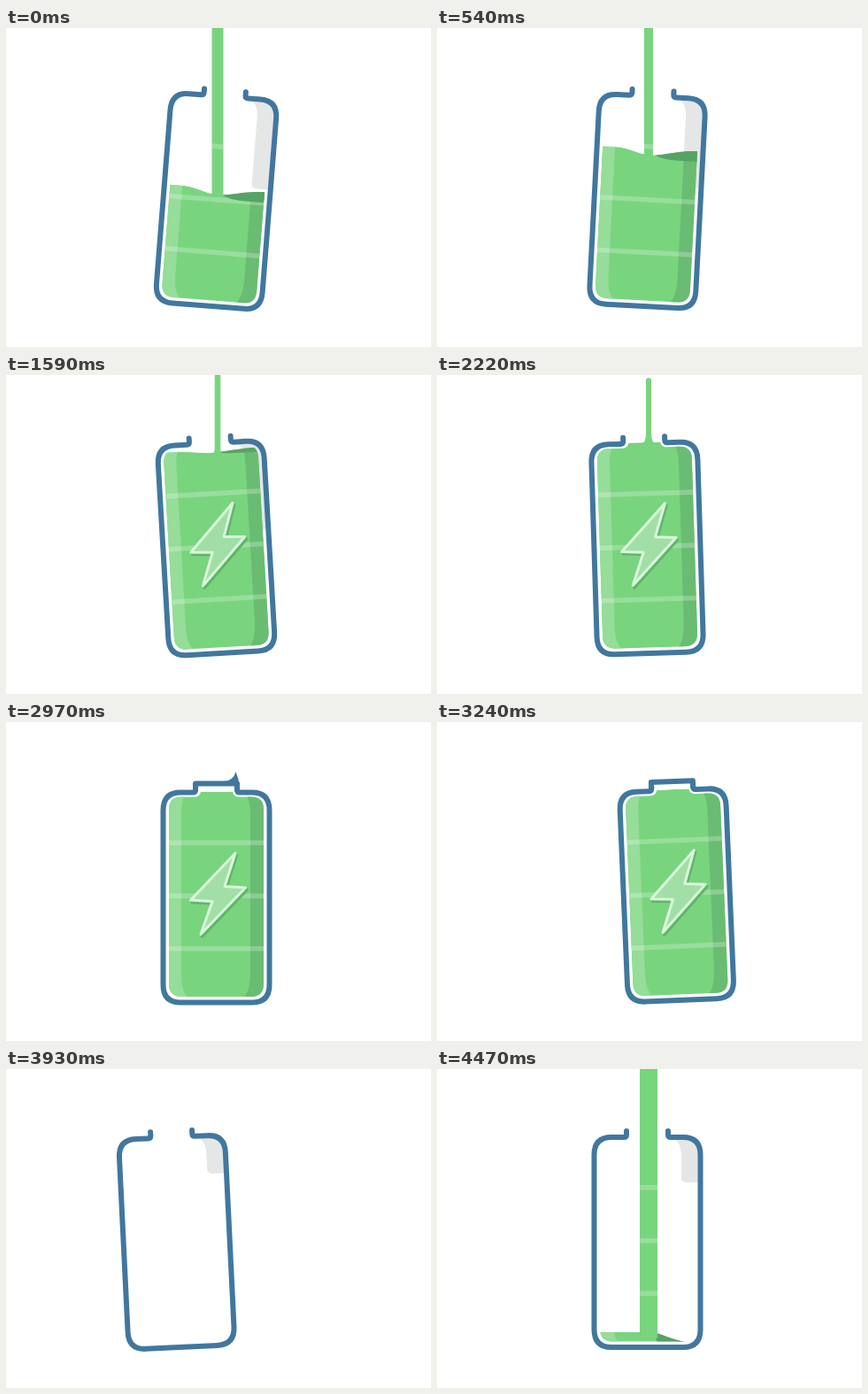
Animation, 480 px wide and 360 px high, one loop 4.5 s. Source, as an HTML page with a canvas:

```html
<!DOCTYPE html>
<html lang="en">
<head>
<meta charset="utf-8">
<title>Battery filling</title>
<style>
html, body { margin: 0; width: 100%; height: 100%; overflow: hidden; background: #fff; }
canvas { display: block; width: 480px; height: 360px; }
</style>
</head>
<body>
<canvas id="stage" width="480" height="360"></canvas>
<script>
const ctx = document.getElementById('stage').getContext('2d');
const LOOP = 4500, FULL = 2220, CX = 237.5, CY = 196, STREAM_X = 239;
const BLUE = '#41779f', GREEN = '#79d47e', LIGHT = '#95dd98', SHADE = '#6abc72', DEEP = '#56a465';

const clamp = v => Math.max(0, Math.min(1, v));
const part = (t, from, to) => clamp((t - from) / (to - from));
const smooth = p => p * p * (3 - 2 * p);

const inner = new Path2D(`M220 76H256Q257 82 263 82H277Q291 82 291 96V293Q291 307.5 277 307.5
  H198Q184 307.5 184 293V96Q184 82 198 82H213Q219 82 220 76Z`);
const glass = new Path2D('M180 79H295V312H180Z');
const shell = new Path2D(`M214 70V74Q214 77 211 77H197Q177.5 77 177.5 97V294Q177.5 314 197 314
  H278Q297.5 314 297.5 294V97Q297.5 77 278 77H264Q261 77 261 74V70`);
const leftGlow = new Path2D('M170 70H209Q198 80 198 98V284Q198 303 207 310H170Z');
const rightShade = new Path2D('M305 70H263Q276 80 276 98V280Q276 303 267 310H305Z');
const bolt = new Path2D('M259 145.5L247 183L270.5 184.5L220 237L233 200L208.5 198.5Z');

function fill(path, color) {
  ctx.fillStyle = color;
  ctx.fill(path);
}

function stroke(path, color, width) {
  ctx.strokeStyle = color;
  ctx.lineWidth = width;
  ctx.lineCap = ctx.lineJoin = 'round';
  ctx.stroke(path);
}

function place(pose) {
  ctx.translate(CX + pose.x, CY + pose.y);
  ctx.rotate(pose.tilt * Math.PI / 180);
  ctx.translate(-CX, -CY);
}

function bands() {
  ctx.fillStyle = 'rgba(255,255,255,.23)';
  for (const y of [131, 191, 250.5]) ctx.fillRect(180, y, 116, 5.5);
}

function drawBolt(alpha) {
  ctx.save();
  ctx.globalAlpha = alpha;
  ctx.translate(1.5, 2.5);
  stroke(bolt, '#61b56b', 3.5);
  ctx.translate(-1.5, -2.5);
  fill(bolt, '#a2dfa7');
  stroke(bolt, '#d9f7da', 3);
  ctx.restore();
}

function drawLiquid({ left, mid, right, back }, boltAlpha) {
  ctx.save();
  ctx.clip(inner);
  const body = new Path2D(`M180 ${left}H198C215 ${left} 222 ${mid} 239 ${mid}
    C256 ${mid} 266 ${right} 295 ${right}V312H180Z`);
  ctx.clip(body);
  fill(body, GREEN);
  fill(leftGlow, LIGHT);
  fill(rightShade, SHADE);
  bands();
  if (back > 0) {
    const low = right + 12 * back;
    fill(new Path2D(`M244 ${mid}C256 ${mid - 2} 266 ${right} 295 ${right}V${low}
      H270Q252 ${low} 244 ${mid}Z`), DEEP);
  }
  if (boltAlpha > 0) drawBolt(boltAlpha);
  ctx.restore();
}

function drawCap(closed, spike) {
  if (closed <= 0) return;
  const end = 214 + 47 * closed;
  stroke(new Path2D(`M214 74V67H${end}${closed === 1 ? 'V74' : ''}`), BLUE, 6);
  if (spike > 0) {
    const tip = 64 - spike;
    fill(new Path2D(`M${end - 16} 65Q${end - 4} 64 ${end - 1.5} ${tip}
      Q${end + 1} ${tip + spike * .6} ${end + 2.5} 67Z`), BLUE);
  }
}

function drawBattery(pose, b) {
  ctx.save();
  place(pose);
  if (b.gloss) {
    ctx.save();
    ctx.clip(glass);
    fill(new Path2D(`M266 78Q276 82 276 98V${b.gloss - 4}Q277 ${b.gloss} 282 ${b.gloss}
      H297V78Z`), '#e5e6e6');
    ctx.restore();
  }
  if (b.surface) drawLiquid(b.surface, b.bolt);
  stroke(shell, BLUE, 6);
  drawCap(b.closed || 0, b.spike || 0);
  ctx.restore();
}

function drawStream(pose, top, bottom, width, flare) {
  if (bottom <= top) return;
  const half = width / 2, l = STREAM_X - half, r = STREAM_X + half;
  const knee = Math.max(top, bottom - 12 * flare);
  const path = new Path2D(`M${l} ${top + half}Q${l} ${top} ${STREAM_X} ${top}
    Q${r} ${top} ${r} ${top + half}V${knee}Q${r} ${bottom} ${r + 7 * flare} ${bottom}
    H${l - 7 * flare}Q${l} ${bottom} ${l} ${knee}Z`);
  ctx.save();
  fill(path, GREEN);
  ctx.clip(path);
  place(pose);
  bands();
  ctx.restore();
}

function fillingScene(t) {
  const rest = 1 - part(t, 0, FULL);
  const level = 76 + 105 * rest * rest;
  const wave = clamp((level - 76) / 20);
  const sway = t < 2700
    ? 4.8 * Math.cos(2 * Math.PI * t / 593 - .35)
    : -4.8 * (1 - smooth(part(t, 2700, 2950)));
  const exit = Math.max(0, t - 3012);
  const pose = {
    x: 6.35e-4 * exit * exit,
    y: 2.5 * Math.sin(Math.PI * part(t, 2760, 3180)),
    tilt: sway - 4.5 * smooth(part(t, 3012, 3450))
  };
  const mid = level + 7 * wave;
  drawBattery(pose, {
    gloss: t < FULL ? 178 : 0,
    surface: { left: level, mid, right: level, back: wave },
    bolt: part(t, 700, 1600),
    closed: part(t, 2730, 2850),
    spike: t < 2850 ? 45 * part(t, 2730, 2850) : 45 * (1 - part(t, 2850, 3015)) ** 1.1
  });
  if (t < 2450) {
    const fall = Math.max(0, t - 2210);
    const top = t < 2210 ? -20 : 3 + .0015 * fall * fall;
    drawStream(pose, top, mid + 2, 6 + 7 * rest * rest, 1 - wave);
  }
}

function arrivingScene(t) {
  const k = Math.max(0, (4460 - t) / 530);
  const pose = { x: -45 * k ** 3, y: 0, tilt: -2.8 * Math.min(1.6, k) };
  const rise = part(t, 4400, 4470);
  const level = 310 - 13 * rise;
  drawBattery(pose, {
    gloss: 120 + 8 * part(t, 3930, 4470),
    surface: rise > 0 && { left: level, mid: level, right: level + 12, back: rise },
    bolt: 0
  });
  const drop = part(t, 4260, 4400);
  if (drop > 0) drawStream(pose, -20, 304 * drop * drop, 20, 0);
}

function render(t) {
  ctx.fillStyle = '#fff';
  ctx.fillRect(0, 0, 480, 360);
  if (t < 3780) fillingScene(t);
  if (t > 3400) arrivingScene(t);
}

const start = performance.now();
function tick() {
  render((performance.now() - start) % LOOP);
  requestAnimationFrame(tick);
}
tick();
</script>
</body>
</html>
```
